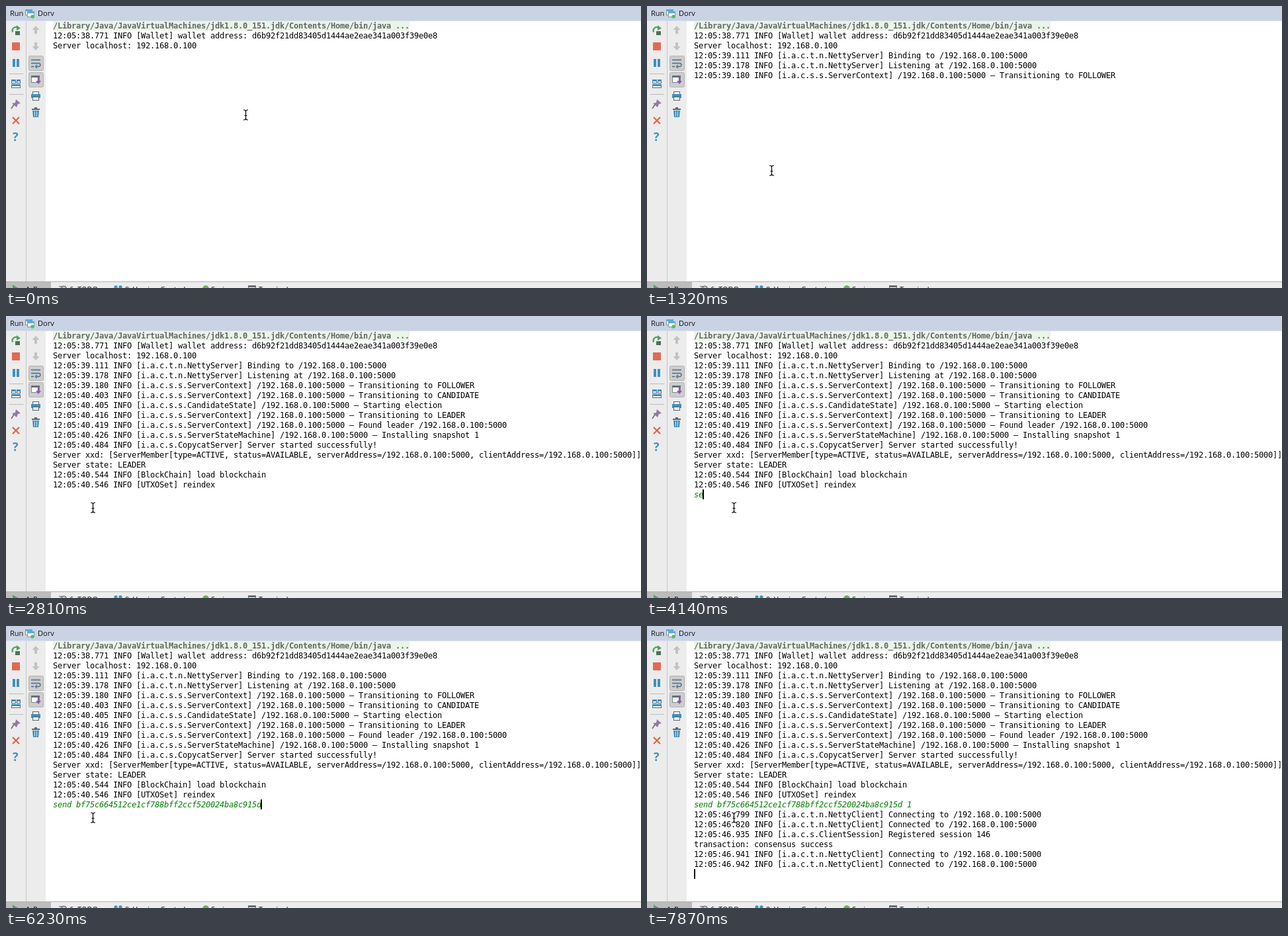
Write an HTML page with a canvas that moves like this. It is 960 by 426 pixels and loops after 8 s.

```html
<!DOCTYPE html>
<html lang="en">
<head>
<meta charset="utf-8">
<title>Run console</title>
<style>
  html, body { margin: 0; width: 100%; height: 100%; overflow: hidden; background: #fff; }
  canvas { display: block; width: 960px; height: 426px; }
</style>
</head>
<body>
<canvas id="stage" width="960" height="426"></canvas>
<script>
const ctx = document.getElementById('stage').getContext('2d');
const LOOP = 8000, LEFT = 71, TOP = 22, ROW = 15, CELL = 7;
const MONO = '"DejaVu Sans Mono", "Liberation Mono", monospace';
const UI = '"Open Sans", "Noto Sans", sans-serif';
const BLUE = '#4190bd', GREEN = '#4fa35f', RED = '#e0664f', DARK = '#5c6670';

const HEADER = '/Library/Java/JavaVirtualMachines/jdk1.8.0_151.jdk/Contents/Home/bin/java ...';
const HOST = '/192.168.0.100:5000';
const log = (time, source, message) => `12:05:${time} INFO [${source}] ${message}`;
const net = (time, name, message) => log(time, 'i.a.c.t.n.' + name, message + ' ' + HOST);
const state = (time, name, message) => log(time, 'i.a.c.s.s.' + name, `${HOST} – ${message}`);

// Each batch of output appears at once, starting at its row.
const batches = [
  { at: 0, row: 1, lines: [
    log('38.771', 'Wallet', 'wallet address: d6b92f21dd83405d1444ae2eae341a003f39e0e8'),
    'Server localhost: 192.168.0.100'] },
  { at: 300, row: 3, lines: [
    net('39.111', 'NettyServer', 'Binding to'),
    net('39.178', 'NettyServer', 'Listening at'),
    state('39.180', 'ServerContext', 'Transitioning to FOLLOWER')] },
  { at: 1620, row: 6, lines: [
    state('40.403', 'ServerContext', 'Transitioning to CANDIDATE'),
    state('40.405', 'CandidateState', 'Starting election'),
    state('40.416', 'ServerContext', 'Transitioning to LEADER'),
    state('40.419', 'ServerContext', 'Found leader ' + HOST),
    state('40.426', 'ServerStateMachine', 'Installing snapshot 1'),
    log('40.484', 'i.a.c.s.CopycatServer', 'Server started successfully!'),
    `Server xxd: [ServerMember[type=ACTIVE, status=AVAILABLE, serverAddress=${HOST}, clientAddress=${HOST}]]`,
    'Server state: LEADER',
    log('40.544', 'BlockChain', 'load blockchain'),
    log('40.546', 'UTXOSet', 'reindex')] },
  { at: 7870, row: 17, lines: [
    net('46.799', 'NettyClient', 'Connecting to'),
    net('46.820', 'NettyClient', 'Connected to'),
    log('46.935', 'i.a.c.s.ClientSession', 'Registered session 146'),
    'transaction: consensus success',
    net('46.941', 'NettyClient', 'Connecting to'),
    net('46.942', 'NettyClient', 'Connected to')] }
];

const COMMAND = 'send bf75c664512ce1cf788bff2ccf520024ba8c915d 1';
const typing = [[4000, 1], [4140, 2], [4740, 3], [4880, 4], [5480, 5], [6230, 45], [6680, 46], [7130, 47]];
const caretFlips = [2360, 2810, 3250, 3850, 4000];

const moves = [
  { times: [300, 440, 590, 740, 880], from: [363, 164], to: [214, 189] },
  { times: [1180, 1320], from: [214, 189], to: [189, 248] },
  { times: [1770, 1920, 2060, 2210, 2360], from: [189, 248], to: [132, 289] }
];

function rect(x, y, w, h, color) {
  ctx.fillStyle = color;
  ctx.fillRect(x, y, w, h);
}

function poly(points, color) {
  ctx.fillStyle = color;
  ctx.beginPath();
  points.forEach(([x, y]) => ctx.lineTo(x, y));
  ctx.fill();
}

function stroke(d, color, width = 1) {
  ctx.strokeStyle = color;
  ctx.lineWidth = width;
  ctx.stroke(new Path2D(d));
}

function dot(x, y, r, color) {
  ctx.fillStyle = color;
  ctx.beginPath();
  ctx.arc(x, y, r, 0, 7);
  ctx.fill();
}

function label(text, x, y, font = '11px ' + UI, color = '#111') {
  ctx.letterSpacing = '0px';
  ctx.font = font;
  ctx.fillStyle = color;
  ctx.fillText(text, x, y);
}

function cells(text, row, color = '#000', style = '') {
  ctx.font = `${style} 12px ${MONO}`;
  ctx.letterSpacing = '0px';
  ctx.letterSpacing = (CELL - ctx.measureText('0'.repeat(20)).width / 20) + 'px';
  ctx.fillStyle = color;
  ctx.fillText(text, LEFT, TOP + row * ROW + 12);
}

function pane(x, y, w, h, bar, color) {
  rect(x, y, w, h, color);
  rect(x + 1, y + 1, w - 2, h - 2, '#f7fafc');
  rect(x, y, w, 3, bar);
}

function arrow(y, dir) {
  poly([[45, y - 6 * dir], [50.5, y], [39.5, y]], '#c2c2c2');
  rect(43, dir > 0 ? y - 1 : y - 6, 4, 7, '#c2c2c2');
}

function pressed(y) {
  ctx.fillStyle = '#cdcdcd';
  ctx.strokeStyle = '#b3b3b3';
  ctx.lineWidth = 1;
  ctx.beginPath();
  ctx.roundRect(34.5, y - 10.5, 22, 22, 2);
  ctx.fill();
  ctx.stroke();
}

function titleBar() {
  rect(0, 0, 960, 22, '#c9d3e4');
  rect(0, 22, 960, 1, '#dce2ec');
  label('Run', 6, 15);
  pane(29, 5, 11, 9, '#5fabd0', '#7f95a5');
  pane(32, 8, 11, 9, '#5fabd0', '#7f95a5');
  dot(40, 16, 2.7, '#5bbd62');
  label('Dorv', 48, 15);
}

function mainTools() {
  stroke('M10 39.5A5.3 5.3 0 0 1 17 32.5', GREEN, 2.2);
  poly([[16, 29], [22, 33.5], [16, 37]], GREEN);
  rect(14, 38, 7, 6, '#52705a');
  rect(9, 55, 12, 12, '#e06a55');
  rect(10, 80, 4, 12, BLUE);
  rect(16, 80, 4, 12, BLUE);
  for (const y of [102, 133])
    for (let x = 5; x < 27; x += 2) rect(x, y, 1, 1, '#8a8a8a');
  pane(8, 111, 7, 6, BLUE, DARK);
  pane(16, 111, 6, 6, BLUE, DARK);
  pane(8, 118, 14, 6, BLUE, DARK);
  poly([[15, 141], [22, 147], [18, 148], [16, 153], [9, 147], [14, 146]], '#8f79a5');
  stroke('M12 149L8 155', '#6f6680', 1.6);
  stroke('M10 168L20 178M20 168L10 178', RED, 2.3);
  label('?', 10, 204, 'bold 18px ' + UI, BLUE);
}

function consoleTools() {
  arrow(36, 1);
  arrow(61, -1);
  pressed(86);
  pressed(111);
  stroke('M38 81.5H52M38 86.5H49Q52 86.5 52 89T49 91.5H46M38 91.5H42', DARK, 1.3);
  poly([[43, 91.5], [47, 88], [47, 95]], BLUE);
  stroke('M39 81.5H43M48 86.5H51', BLUE, 1.5);
  pane(38, 105, 13, 11, '#66717a', '#7c858c');
  stroke('M49 108V114', '#8c5aa8', 2.4);
  poly([[45, 113], [53, 113], [49, 118]], '#8c5aa8');
  rect(40, 129, 10, 4, DARK);
  rect(41, 130, 8, 3, '#f4f4f4');
  rect(38, 133, 14, 6, BLUE);
  rect(40, 137, 10, 6, DARK);
  rect(41, 138, 8, 4, '#f4f4f4');
  rect(39, 155, 12, 2, DARK);
  rect(43, 153, 4, 2, DARK);
  poly([[40, 158], [50, 158], [49, 168], [41, 168]], BLUE);
  stroke('M43.5 159V167M46.5 159V167', '#d7e6ef');
}

function bottomBar() {
  rect(0, 416, 960, 10, '#ececec');
  rect(0, 417, 68, 9, '#bcbcbc');
  rect(0, 416, 960, 1, '#b2b2b2');
  poly([[10, 421], [20, 427], [10, 433]], GREEN);
  label('4: Run', 29, 432);
  stroke('M80 423.5H87M81 426H90', DARK, 1.2);
  stroke('M84 429A4 4 0 1 1 91 429', DARK, 1.2);
  label('6: TODO', 96, 432);
  dot(166, 424.5, 2.6, '#3e9db8');
  dot(173, 424.5, 2.6, BLUE);
  label('9: Version Control', 180, 432);
  dot(302, 427, 5, '#6fb25a');
  label('Spring', 310, 432);
  pane(366, 422, 12, 10, '#626b73', '#626b73');
  label('Terminal', 382, 432);
}

function chrome() {
  rect(0, 0, 960, 426, '#fff');
  titleBar();
  rect(0, 23, 60, 393, '#ececec');
  rect(30, 23, 1, 393, '#c6c6c6');
  mainTools();
  consoleTools();
  bottomBar();
}

function caret(t, typed) {
  const flips = caretFlips.filter(at => t >= at).length;
  if (flips % 2 === 0) return;
  const row = t >= 7870 ? 23 : t >= 7570 ? 17 : 16;
  const x = row === 16 && typed ? LEFT + typed * CELL - 1 : LEFT;
  rect(x, TOP + row * ROW, 2, ROW, '#000');
}

function pointer(t) {
  let [x, y] = moves[0].from;
  for (const { times, from, to } of moves) {
    const done = times.filter(at => t >= at).length;
    if (!done) break;
    const p = done / times.length, k = p * (2 - p);
    x = Math.round(from[0] + (to[0] - from[0]) * k);
    y = Math.round(from[1] + (to[1] - from[1]) * k);
  }
  ctx.save();
  ctx.translate(x - 0.5, y + 0.5);
  const beam = 'M-3.5 -7.5H-2Q0 -7 0 -5Q0 -7 2 -7.5H3.5M0 -5V5M-3.5 7.5H-2Q0 7 0 5Q0 7 2 7.5H3.5M-2 1H2';
  stroke(beam, 'rgba(255,255,255,.8)', 2.4);
  stroke(beam, '#000', 1.2);
  ctx.restore();
}

function draw(t) {
  chrome();
  rect(LEFT, 23, HEADER.length * CELL, 14, '#e9f5e6');
  cells(HEADER, 0, '#666', 'bold');
  for (const { at, row, lines } of batches)
    if (t >= at) lines.forEach((line, i) => cells(line, row + i));
  const typed = typing.reduce((n, [at, count]) => t >= at ? count : n, 0);
  if (typed) cells(COMMAND.slice(0, typed), 16, '#007f00', 'italic');
  caret(t, typed);
  pointer(t);
}

let start;
function tick(now) {
  start ??= now;
  draw((now - start) % LOOP);
  requestAnimationFrame(tick);
}
requestAnimationFrame(tick);
</script>
</body>
</html>
```
